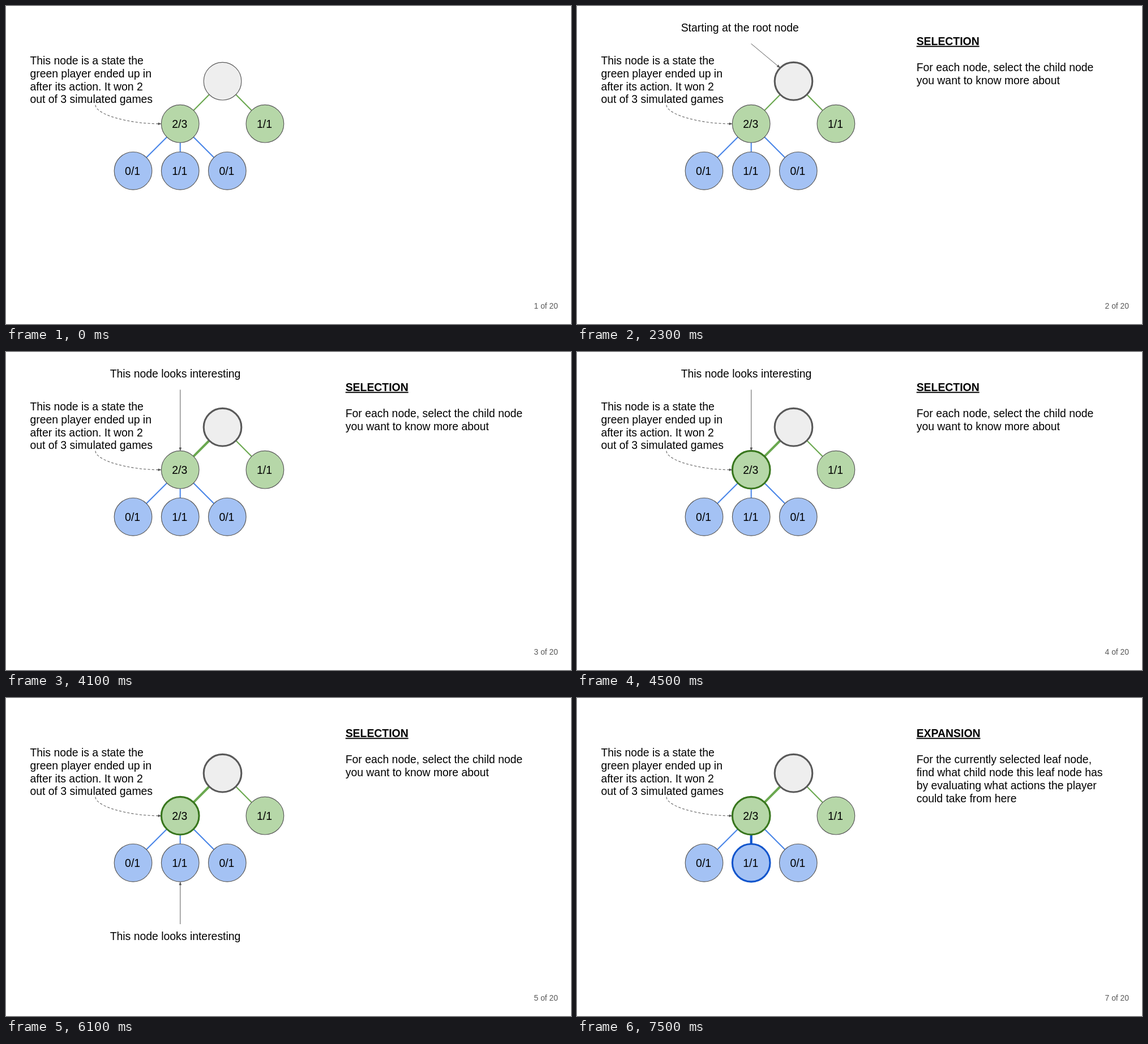
Recreate the animation shown at these times as an HTML page. Size 998 by 561 pixels, loop 8 s.

```html
<!DOCTYPE html>
<html lang="en">
<head>
<meta charset="utf-8">
<title>Tree search</title>
<style>
  html, body { margin: 0; width: 100%; height: 100%; overflow: hidden; background: #fff; }
  svg { display: block; width: 998px; height: 561px; }
  text { font: 19.4px "Liberation Sans", Arial, sans-serif; white-space: pre; }
</style>
</head>
<body>
<svg id="stage" viewBox="0 0 998 561"></svg>
<script>
const LOOP = 8000;
const STARTS = [0, 500, 3500, 4500, 5500, 6500, 7500];
const GREY = '#595959', GREEN = '#6aa84f', BLUE = '#4a86e8', DEEP_BLUE = '#1155cc';
const R = 33.3, LINE = 22.9;
const stage = document.getElementById('stage');

const text = (x, y, s, attrs = '') => `<text x="${x}" y="${y}" ${attrs}>${s}</text>`;

const lines = (x, y, list) => list.map((s, i) => text(x, y + i * LINE, s)).join('');

const path = (d, color, width, attrs = '') =>
  `<path d="${d}" fill="none" stroke="${color}" stroke-width="${width}" ${attrs}/>`;

function node(x, y, label, fill, strongColor) {
  return `<circle cx="${x}" cy="${y}" r="${R}" fill="${fill}"
    stroke="${strongColor || GREY}" stroke-width="${strongColor ? 3.12 : 1.15}"/>` +
    text(x - 0.9, y + 7.1, label, 'text-anchor="middle"');
}

// Joins two node centres, trimmed to the circles' edges
function edge(x1, y1, x2, y2, color, strong) {
  const dx = Math.sign(x2 - x1), k = R * (dx ? Math.SQRT1_2 : 1);
  return path(`M${x1 + dx * k} ${y1 + k}L${x2 - dx * k} ${y2 - k}`, color, strong ? 4.16 : 2.08);
}

function head(x, y, angle) {
  return `<path d="M-1 0l-4.7 -1.72v3.44z" fill="${GREY}" stroke="${GREY}"
    transform="translate(${x} ${y}) rotate(${angle})"/>`;
}

function arrow(x1, y1, x2, y2) {
  const angle = Math.atan2(y2 - y1, x2 - x1);
  const endX = x2 - 4 * Math.cos(angle), endY = y2 - 4 * Math.sin(angle);
  return path(`M${x1} ${y1}L${endX} ${endY}`, GREY, 1) + head(x2, y2, angle * 180 / Math.PI);
}

function tree(step) {
  const greenPick = step >= 3 && '#38761d', bluePick = step >= 5 && DEEP_BLUE;
  return edge(382.5, 132.7, 307.7, 207.7, GREEN, step >= 2) +
    edge(382.5, 132.7, 457.4, 207.7, GREEN) +
    edge(307.7, 207.7, 224.5, 290.8, BLUE) +
    edge(307.7, 207.7, 307.7, 290.8, bluePick || BLUE, bluePick) +
    edge(307.7, 207.7, 390.8, 290.8, BLUE) +
    node(382.5, 132.7, '', '#eee', step >= 1 && GREY) +
    node(307.7, 207.7, '2/3', '#b6d7a8', greenPick) +
    node(457.4, 207.7, '1/1', '#b6d7a8') +
    node(224.5, 290.8, '0/1', '#a4c2f4') +
    node(307.7, 290.8, '1/1', '#a4c2f4', bluePick) +
    node(390.8, 290.8, '0/1', '#a4c2f4');
}

function note() {
  return lines(42.4, 102.7, ['This node is a state the', 'green player ended up in',
    'after its action. It won 2', 'out of 3 simulated games']) +
    path('M158 174.5C158 191.2 216 207.8 270.4 207.8', GREY, 1.04, 'stroke-dasharray="4.16 3.12"') +
    head(274.6, 207.8, 0);
}

function pointer(step) {
  const looks = 'This node looks interesting';
  if (step === 1) return text(183.7, 44.9, 'Starting at the root node') + arrow(307.6, 66.5, 358.9, 109.2);
  if (step === 2 || step === 3) return text(183.7, 44.9, looks) + arrow(307.8, 66.5, 307.8, 174.6);
  if (step === 4 || step === 5) return text(183.7, 427.2, looks) + arrow(307.8, 399, 307.8, 324);
  return '';
}

function phase(step) {
  if (!step) return '';
  const expand = step === 6;
  const title = expand ? 'EXPANSION' : 'SELECTION';
  const body = expand
    ? ['For the currently selected leaf node,', 'find what child node this leaf node has',
       'by evaluating what actions the player', 'could take from here']
    : ['For each node, select the child node', 'you want to know more about'];
  return text(599.7, 69.3, title, 'style="font-weight:bold;text-decoration:underline"') +
    lines(599.7, 115.2, body);
}

function draw(step) {
  stage.innerHTML = tree(step) + note() + pointer(step) + phase(step) +
    text(932.6, 534.3, `${step + 1} of 20`, `style="font-size:13.86px" fill="${GREY}"`);
}

let shown = -1;
function tick() {
  const t = performance.now() % LOOP;
  const step = STARTS.filter(s => s <= t).length - 1;
  if (step !== shown) draw(shown = step);
  requestAnimationFrame(tick);
}
tick();
</script>
</body>
</html>
```
